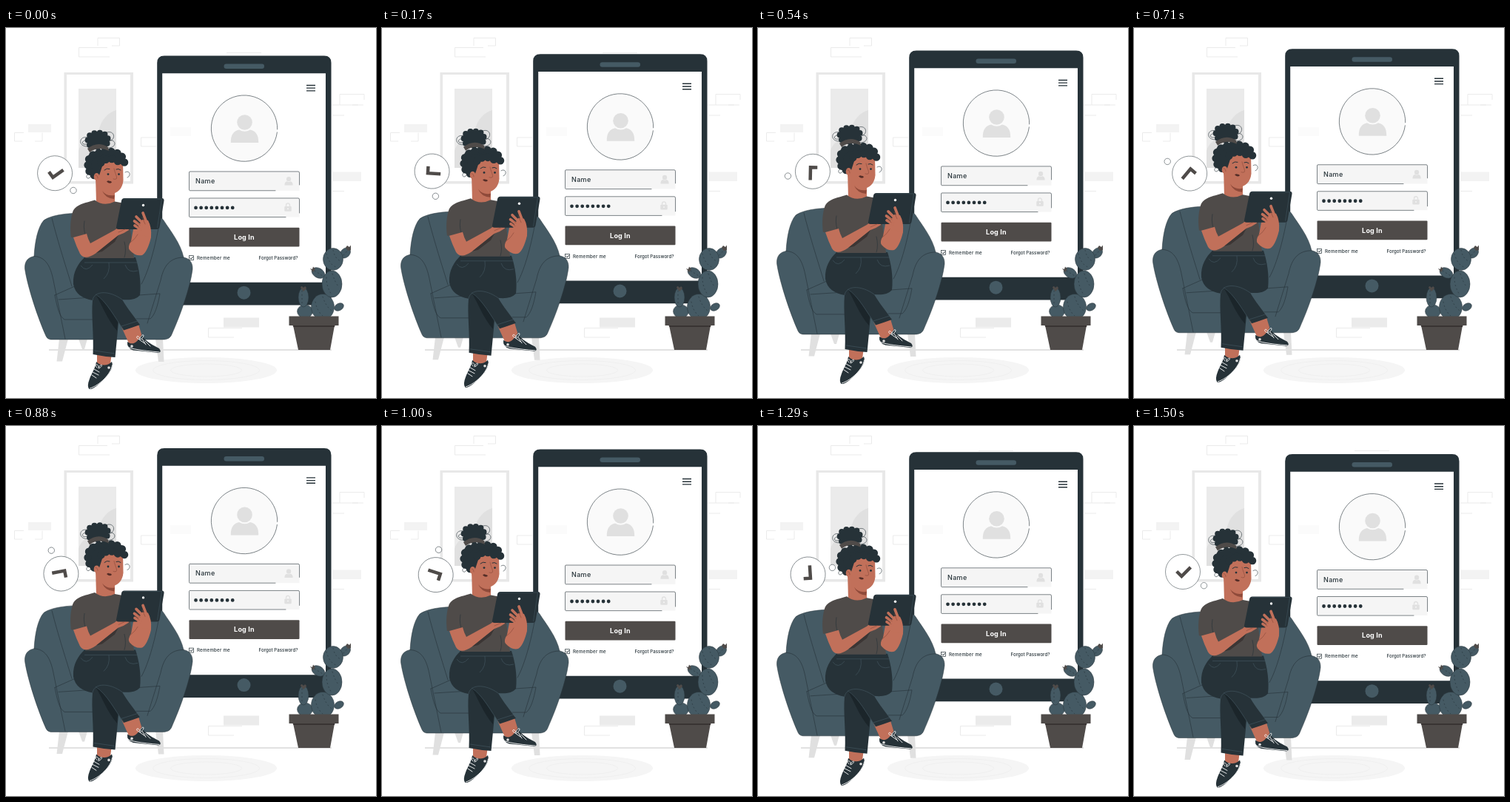
An HTML page for the animation above (1540 ms loop, 500 by 500 pixels).

```html
<!DOCTYPE html>
<html lang="en">
<head>
<meta charset="utf-8">
<title>Log in</title>
<style>
  html, body { margin: 0; width: 100%; height: 100%; overflow: hidden; background: #fff; }
  svg { display: block; width: 100vw; height: 100vh; }
  text { font-family: Inter, sans-serif; font-weight: 500; fill: #263238; }
  .navy { fill: #263238; }
  .slate { fill: #455a64; }
  .brown { fill: #4f4b49; }
  .skin { fill: #c1705a; }
  .pale { fill: #f5f5f5; }
  .grey { fill: #e0e0e0; }
  .line { fill: none; stroke: #263238; stroke-width: .6; stroke-linecap: round; }
  .seam { fill: none; stroke: #455a64; stroke-width: .6; }
  .brick { fill: none; stroke: #e6e6e6; stroke-width: .8; }
  .finger { fill: none; stroke: #c1705a; stroke-linecap: round; stroke-linejoin: round; }
  .crease { fill: none; stroke: #88483a; stroke-width: .6; stroke-linecap: round; }
  .curls { fill: #263238; stroke: #263238; stroke-linecap: round; }
  .lace { fill: none; stroke: #fff; stroke-width: .9; stroke-linecap: round; }
  .edged { stroke: #263238; stroke-width: .5; }
</style>
</head>
<body>
<svg viewBox="0 0 500 500">
  <!-- wall -->
  <path class="brick" d="M124 24V13.500H153.500V24H143M98.500 26.500H137M98.500 26.500V39H140M49 141.500V153H39M24 141.500H11.500V153H22M203 148H182.500V160H203M298 33.500H345M451 104V89.500H484V97M483 104H440M441 118H457M468 104H476M441 220.500H457M319 405.500H273.500V418H308"/>
  <path fill="#f3f3f3" d="M30 130H61V141H30zM441 194.500H480V207H441z"/>
  <path fill="#fbfbfb" d="M222 134H250V146H222z"/>
  <path fill="#ebebeb" d="M294 391.500H342V404.500H294z"/>
  <path fill="#e8e8e8" d="M78.500 60H172V210.500H78.500z"/>
  <path fill="#fff" d="M82 63H168V207H82z"/>
  <path fill="#ebebeb" d="M98 82H149V189H98z"/>
  <path class="grey" d="M98 189V166C103 148 120 153 126 136C130 122 139 114 149 111V189z"/>
  <ellipse class="pale" cx="270.500" cy="462.500" rx="95.500" ry="17.500"/>
  <g fill="none" stroke="#ebebeb" stroke-width=".6">
    <ellipse cx="270.500" cy="462.500" rx="72" ry="13"/>
    <ellipse cx="270.500" cy="462.500" rx="48" ry="8.500"/>
  </g>
  <path fill="none" stroke="#b5b5b5" stroke-width=".8" d="M58 435H440"/>

  <g id="bubble">
    <circle cx="66" cy="197" r="23.500" fill="#fff" class="edged"/>
    <circle cx="94.500" cy="215.700" r="4.200" fill="#fff" class="edged"/>
    <path d="M57.700 196.500L64.300 203L76.500 190.800" fill="none" stroke="#4f4b49" stroke-width="4.500"/>
  </g>

  <g id="floating">
    <!-- tablet screen -->
    <path class="navy" fill-rule="evenodd" d="M214 38.500H430Q439.500 38.500 439.500 48V366Q439.500 375.500 430 375.500H214Q204.200 375.500 204.200 366V48Q204.200 38.500 214 38.500zM211.200 62.300V344.800H432V62.300z"/>
    <rect class="slate" x="294.500" y="49.500" width="54.500" height="6.500" rx="3.200"/>
    <circle class="slate" cx="321.500" cy="358.700" r="9"/>
    <path d="M406 78.500H418M406 82.200H418M406 85.900H418" stroke="#263238" stroke-width="1.400"/>
    <circle cx="322" cy="137.300" r="44.700" fill="#fafafa"/>
    <path class="line" d="M366.400 142A44.700 44.700 0 1 1 366.700 138"/>
    <g id="person" class="grey">
      <circle cx="322.500" cy="128.500" r="10.300"/>
      <path d="M303.800 156C303.500 145 308 140 315 138.500Q322.500 143 330 138.500C337 140 341.500 145 341.200 156z"/>
    </g>
    <path class="pale" d="M247.500 195H396.500V220.800H247.500zM247.500 231H396.500V256.600H247.500z"/>
    <path class="line" d="M364 220.800H248.500Q247.500 220.800 247.500 219V196Q247.500 195 249 195H395Q396.500 195 396.500 197V213M378 256.600H248.500Q247.500 256.500 247.500 255V232Q247.500 231 249 231H395Q396.500 231 396.500 233V251"/>
    <use href="#person" transform="translate(285.300 165.300) scale(.3 .31)"/>
    <rect class="grey" x="376.300" y="242" width="9.400" height="6.800" rx="1"/>
    <path d="M378.500 242V240.500A2.500 2.500 0 0 1 383.500 240.500V242" fill="none" stroke="#e0e0e0" stroke-width="1.300"/>
    <circle cx="381" cy="245.200" r="1" fill="#f5f5f5"/>
    <text x="256" y="211.100" font-size="9" letter-spacing=".35">Name</text>
    <path d="M256.500 244H307" stroke="#263238" stroke-width="4.800" stroke-linecap="round" stroke-dasharray="0 7.100"/>
    <rect class="brown" x="247.500" y="270.800" width="149" height="25.700" rx="1"/>
    <text x="322" y="286.800" font-size="9" letter-spacing=".2" text-anchor="middle" style="font-weight:700;fill:#fff">Log In</text>
    <rect x="247.500" y="308.700" width="6" height="6" fill="#fff" stroke="#263238" stroke-width=".7"/>
    <path d="M248.700 311.600L250.200 313.200L252.600 310.200" fill="none" stroke="#263238"/>
    <text x="258" y="313.800" font-size="6.100" letter-spacing=".25">Remember me</text>
    <text x="394.500" y="313.800" font-size="6.100" letter-spacing=".05" text-anchor="end">Forgot Password?</text>

    <!-- armchair -->
    <path class="grey" d="M72 421L68.500 451.500H76L84 421zM98 421L103 435H106L110 421zM202 421L206 452H213.500L212 421z"/>
    <path class="slate edged" d="M62 422C57 422 55 420 53 415C40 385 28 345 25.500 326C25 316 30 311 38 309.500C39 290 43 270 51 261C62 253 85 251.500 100 251H185C200 252 210 256 213 261C222 275 236 292 240 311C248 312.500 252.500 318 252 327C249 352 236 388 224 415C222 420 218 422 212 422z"/>
    <path class="line" d="M38 309.500C53 310 60 322 64 342L80 421M62 258C70 290 83 330 89 350M66 362L93 350M66 362C69 378 72 391 79 395H118M240 311C222 311 213 322 209 342L191 400M208 260C203 292 193 330 183 347M180 362L208 360C205 377 201 389 195 394H176M71 368L117 365"/>

    <!-- lower body -->
    <path class="skin" d="M123 440L123 455Q132 463 141 455L143 440zM156 405L166 427Q177 431 184 418L178 398z"/>
    <path class="navy" d="M106 311H175C180 326 183 345 181 362C176 368 167 369 157 368C164 380 174 392 181 402Q170 406 159 409.500L152 399L147.500 446Q132 445 117.500 442C119 415 115 390 117 369C104 367 93 360 91 347C90 330 98 319 106 311z"/>
    <path fill="#1b252a" d="M121 361C131 366 142 384 151 397L150 410C136 394 130 375 121 361z"/>
    <path class="seam" d="M106 318H177M101 322Q108 332 117 321M161 321Q165 333 178 329M139 318Q141 332 132 340M117 369C119 356 139 355 157 368M121 361C136 370 148 394 159 409M119 437L147 441M156 404L178 397"/>

    <path class="navy" d="M164 425C172 431 178 425 183 415.500C188 425 200 430 207 434Q211 439 206 440L172 436.500Q163 434 164 425z"/>
    <path class="lace" d="M165 432Q170 436 207 439M180 422L187 427M184 421L189 429M188 424L195 431M181 422C173 421 178 413 181 421C184 412 190 416 182 422"/>
    <circle cx="170" cy="431" r="1.800" fill="#e0e0e0"/>
    <path class="navy" d="M122 452C128 458 137 458 143 452C146 459 140 468 133 475C126 482 118 490 112.500 489Q109 485 113 475C116 467 121 460 122 452z"/>
    <path class="lace" d="M143.500 457C142 469 126 484 113.500 488M119 462L126 466M117 466L125 470M116 470L122 474M123 460C117 455 126 454 125 460C130 452 132 459 125 461"/>
    <circle cx="139" cy="460" r="1.800" fill="#e0e0e0"/>

    <!-- torso and arms -->
    <path class="skin" d="M121 200L122 238Q138 245 147 237V218z"/>
    <path d="M130 221Q136 229 147 227L146 232Q134 231 130 221z" fill="#8f4a3a"/>
    <path class="brown" d="M120 233.500C106 238 94 239 90 250C86 263 87 276 88 284L108 283L111 294L107 312H173L169 280L163 240Q155 236 147 235.500Q132 243 120 233.500z"/>
    <path class="line" d="M106 262C104 274 107 280 111 291M160 290Q163 302 160 311"/>
    <path class="skin" d="M91 284L109 279Q111 287 114 292L147 274Q153 268 164 267L166 274Q159 279 152 281L122 305C112 312 104 313 100 306Q95 296 91 284z"/>
    <path fill="#3b3534" d="M122 305L152 281L147 290L130 303z"/>
    <path class="skin" d="M172 273L169 289Q164 297 167 301Q175 310 184 308Q191 304 196 284L195 266L181 265z"/>
    <path class="navy" d="M160 231H210.500Q214 231 213.500 234.500L207.500 270Q207 273 203.500 273H152Q148.500 273 149 270L156 234.500Q156.500 231 160 231z"/>
    <path d="M159 232H210.500L204.500 271" fill="none" stroke="#455a64" stroke-width=".5"/>
    <circle cx="185.500" cy="240.500" r="1.700" fill="#fff"/>
    <path class="skin" d="M179 269L184 260L192 261Q197 270 196 283L180 281Q175 275 179 269z"/>
    <path class="finger" stroke-width="3.700" d="M185 265L176 256M183 269L173.500 262M182 273L174 268M190 264L185 251"/>
    <path class="crease" d="M181 267L176 261M180 271L175 266M188 266L184 257M152 277L161 273M168 291Q175 286 178 280"/>

    <!-- head -->
    <path class="curls" stroke-width="8" stroke-dasharray="0 7" d="M113 159C107 150 113 143 123 143C133 142 140 147 137 156C135 163 118 164 113 159z"/>
    <path class="navy" d="M113 159C107 150 113 143 123 143C133 142 140 147 137 156C135 163 118 164 113 159z"/>
    <path class="line" d="M110 149C98 146 97 162 110 161M108 153C101 153 102 160 109 158M134 143C146 137 150 151 140 154M138 153C149 150 151 163 138 163"/>
    <path class="skin" d="M120 178Q142 169 158 181L158.500 207C157.500 219 149 226 140 225C130 223 123 216 121 206z"/>
    <path class="navy" d="M112 199Q104 185 112 172Q132 158 160 174L163 187Q149 184 140 178Q131 181 129 191L125 203Q118 205 112 199z"/>
    <path class="curls" fill-opacity="0" stroke-width="10.500" stroke-dasharray="0 8.500" d="M119 200L112 194L110 183L114 174L124 170L134 168L146 168L155 172L160 180L160 186M151 181L140 177L129 181L126 190"/>
    <path class="brown" d="M110 164Q124 153 138 162L139 167Q125 160 113 169z"/>
    <path class="line" d="M161 196C168 192 169 202 164 203M112 198C105 201 111 208 114 202"/>
    <ellipse class="skin" cx="122.500" cy="202" rx="3.800" ry="5"/>
    <path class="crease" d="M121 200Q124 200 124 204M146 191C147 197 151 203 149 205Q147 206 145 205"/>
    <path class="line" style="stroke-width:1" d="M133 193Q136 190 140 191.500M149 192Q152 190.500 155 193"/>
    <circle class="navy" cx="138" cy="198.600" r="1.400"/>
    <circle class="navy" cx="152.500" cy="198.600" r="1.400"/>
    <path fill="#542d27" d="M136 208.500Q138.500 206.500 140 208Q142 207.500 143 209.500Q140 212.500 136 208.500z"/>
  </g>

  <!-- potted cactus -->
  <g class="slate edged">
    <ellipse cx="404" cy="383" rx="10.500" ry="9"/>
    <ellipse cx="402" cy="364" rx="7" ry="13"/>
    <ellipse cx="450" cy="377" rx="6.800" ry="4.700" transform="rotate(-30 450 377)"/>
    <ellipse cx="458.500" cy="304" rx="8" ry="6" transform="rotate(-45 458.500 304)"/>
    <ellipse cx="422" cy="331" rx="9.500" ry="6.500" transform="rotate(30 422 331)"/>
    <ellipse cx="428" cy="377" rx="15.500" ry="17.500"/>
    <ellipse cx="440.500" cy="346" rx="13.500" ry="18"/>
    <ellipse cx="442" cy="312.500" rx="13.500" ry="15"/>
  </g>
  <path class="line" stroke-dasharray="1.200 4" d="M433 305Q437 320 446 323M442 300Q444 311 452 315M433 337Q433 350 440 360M441 332Q445 345 450 350M418 370Q420 382 428 389M428 363Q432 376 440 382M400 355V372M417 328L428 335M456 307L463 299"/>
  <path class="brown" d="M398 351Q399 347 402 351Q405 347 406 352L402 356zM459 297L461 294L464 296L466 293.500L466 300L462 301zM411 325L414 326L415 322.500L418 326L415 330z"/>
  <path class="brown" d="M382.500 389.500H449.500V402H382.500zM388 402H444L438 435H395z"/>
  <path fill="#393433" d="M387.500 402H444.500L444 404H388.500z"/>
</svg>
<script>
  const LOOP = 1540, STEPS = 37;
  const floating = document.getElementById('floating');
  const bubble = document.getElementById('bubble');

  function draw(now) {
    const step = Math.floor(now % LOOP / LOOP * STEPS + .1);
    const phase = (step + 1) / STEPS % 1;
    const lift = 10.5 - 10 * Math.abs(1 - 2 * phase);
    floating.setAttribute('transform', `translate(0 ${-lift})`);
    bubble.setAttribute('transform', `rotate(${360 * phase} 70.6 197)`);
    requestAnimationFrame(() => draw(performance.now()));
  }
  draw(performance.now());
</script>
</body>
</html>
```
